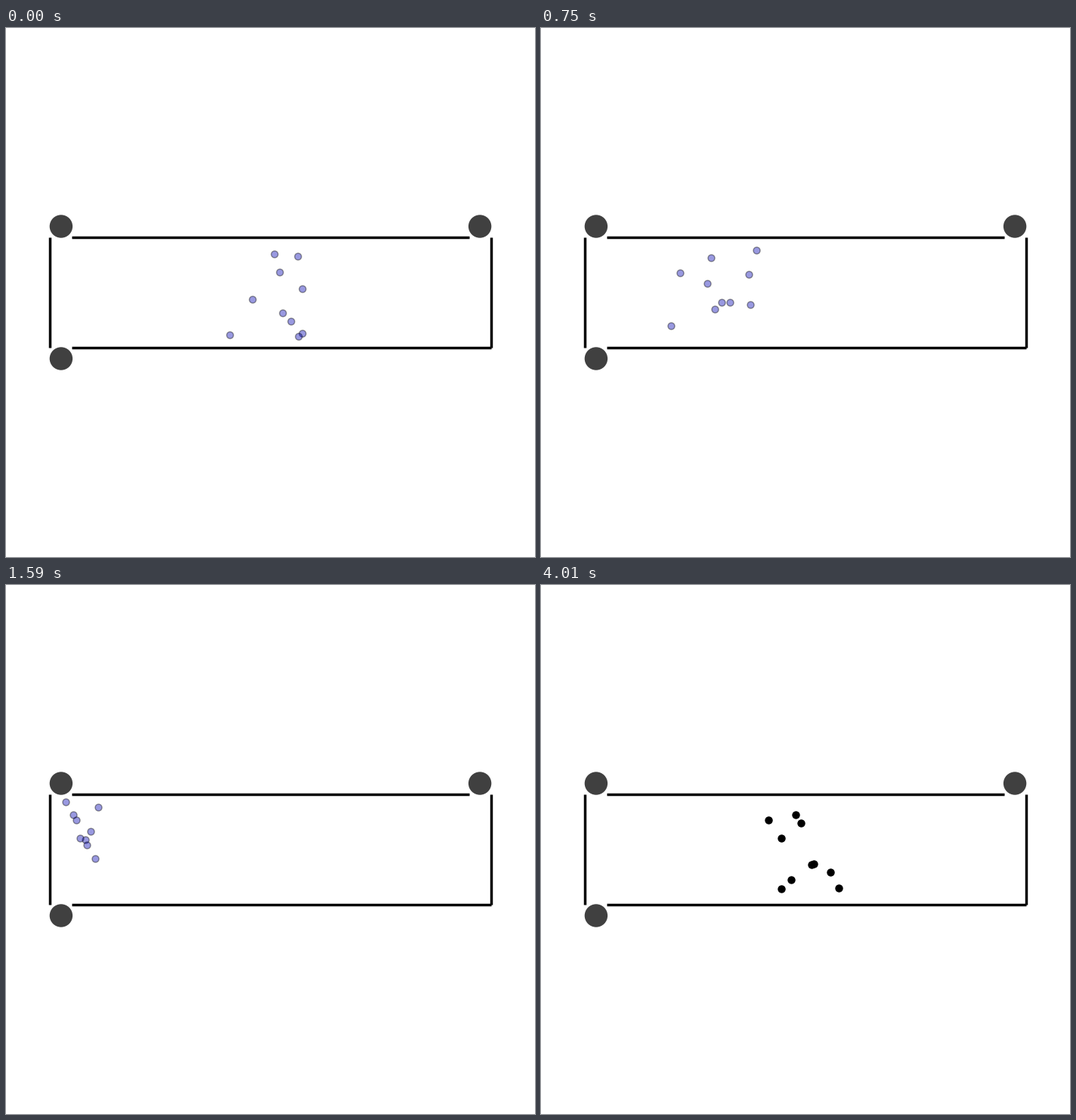
These frames come from a looping animation (700 px wide and 700 px high, 4.04 s). A matplotlib script:

```python
import numpy as np
import matplotlib.pyplot as plt
from matplotlib.animation import FuncAnimation
from matplotlib.patches import Circle

SIZE, DPI = 700, 100
TICK, TICKS_PER_STEP, LOOP = 10, 3, 4040
UNIT = SIZE / 6                  # the stage spans 6 by 6 units
SPEED = 0.05 * UNIT              # pixels per step, |dx| + |dy|
SETTLE, CRUISE_STEP, LAST_STEP = 10, 15, 80
RESET_TICK = 401
DOOR = np.array([74, 271])
TURN_SLOPE = 2                   # walkers turn once the door is this steep
ELBOW_ROOM = 8


def points(*xy):
    return np.array(xy) - 0.3


START = points((386.5, 302), (355, 299.5), (326.5, 359), (392.5, 345),
               (362.5, 323), (377, 388), (392, 404.5), (366, 377),
               (387, 408), (296.5, 406.5))
CRUISE = points((343.5, 294), (284, 304.5), (243, 324), (334, 326.5),
                (279, 338.5), (298, 363.5), (308.5, 363), (288.5, 372),
                (336, 366.5), (230.5, 394))
NEXT_CROWD = points((301.5, 311), (337.5, 304.5), (344, 315.5), (318.5, 335.5),
                    (358.5, 370.5), (361, 369), (383.5, 380.5), (331, 390.5),
                    (318.5, 402.5), (394, 401.5))


def spread(step):
    """The crowd loosens up while it starts walking left."""
    run = np.array([SPEED, 0])
    shift = START - (CRUISE + run * CRUISE_STEP)
    rest = max(0, 1 - step / SETTLE) ** 2
    return CRUISE + run * (CRUISE_STEP - step) + rest * shift


def jostle(pos):
    """Push apart walkers that stand closer than the elbow room."""
    gap = pos[:, None] - pos[None]
    dist = np.hypot(gap[..., 0], gap[..., 1]) + 1e-6
    push = np.maximum(0, ELBOW_ROOM - dist) / 2 / dist
    return pos + (gap * push[..., None]).sum(axis=1)


def walk(pos):
    """Go left, then straight to the door; whoever reaches it is gone."""
    way = DOOR - pos
    turned = -way[:, 1] >= -TURN_SLOPE * way[:, 0]
    goal = np.where(turned[:, None], way, [-1, 0])
    goal = goal / np.abs(goal).sum(axis=1, keepdims=True)
    pos = jostle(pos + SPEED * goal)
    return pos[np.abs(DOOR - pos).sum(axis=1) > SPEED]


def simulate():
    track = [spread(step) for step in range(CRUISE_STEP + 1)]
    while len(track) < LAST_STEP:
        track.append(walk(track[-1]))
    return track + [np.empty((0, 2))]


def px(u):
    return SIZE / 2 + u * UNIT


fig = plt.figure(figsize=(SIZE / DPI, SIZE / DPI), dpi=DPI, facecolor="white")
ax = fig.add_axes([0, 0, 1, 1])
ax.set_xlim(0, SIZE)
ax.set_ylim(SIZE, 0)
ax.axis("off")

left, right, top, bottom = px(-2.5), px(2.5), px(-0.625), px(0.625)
gap = 0.25 * UNIT
walls = [((left + gap, right - gap), (top, top)),
         ((left + gap, right), (bottom, bottom)),
         ((left, left), (top, bottom)),
         ((right, right), (top, bottom))]
for xs, ys in walls:
    ax.plot(xs, ys, color="black", lw=2.5, solid_capstyle="butt")

for u, v in [(-2.375, -0.75), (2.375, -0.75), (-2.375, 0.75)]:
    ax.add_patch(Circle((px(u), px(v)), 15.2, fc="black", ec="none",
                        alpha=0.75, zorder=4))

dot = dict(s=42, lw=1, ec="black", zorder=3)
crowd = ax.scatter(*START.T, fc=[(0, 0, 0.7)], alpha=0.4, **dot)
fresh = ax.scatter(*NEXT_CROWD.T, fc="black", **dot)
TRACK = simulate()


def draw(tick):
    step = min(tick // TICKS_PER_STEP, LAST_STEP)
    crowd.set_offsets(TRACK[step])
    fresh.set_visible(tick >= RESET_TICK)
    return crowd, fresh


anim = FuncAnimation(fig, draw, frames=LOOP // TICK, interval=TICK,
                     repeat=True, repeat_delay=0)
plt.show()
```
